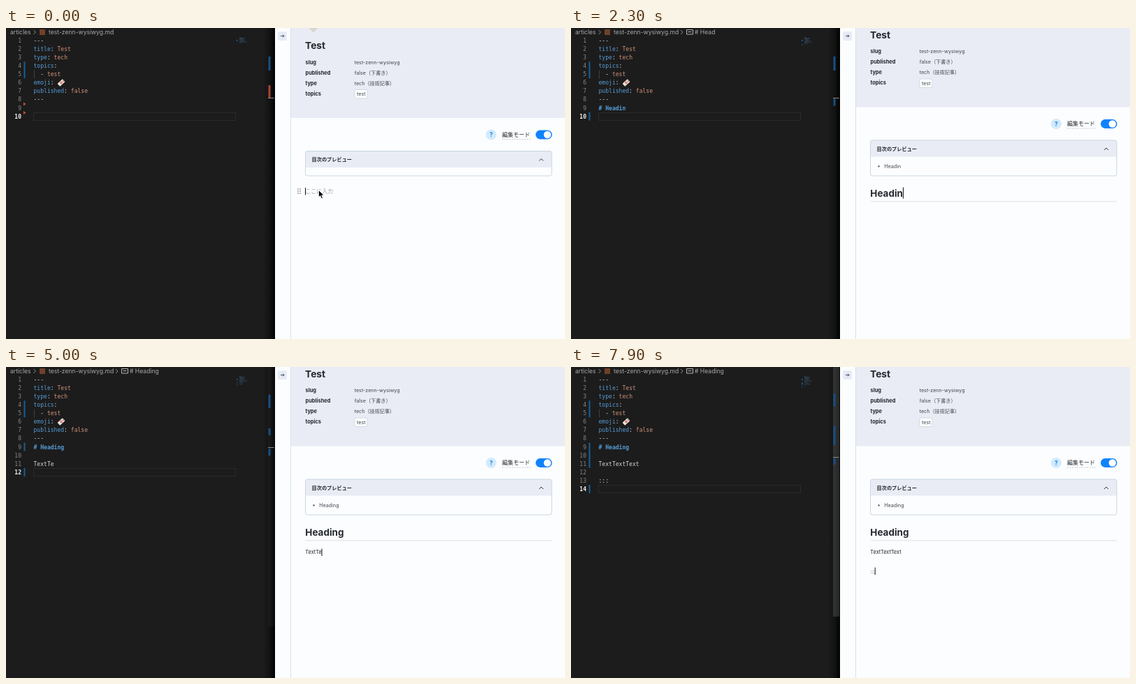
Animation of 800 by 446 pixels, one loop 8000 ms. Source, as an HTML page:

```html
<!DOCTYPE html>
<html lang="ja">
<head>
<meta charset="utf-8">
<title>Markdown editor</title>
<style>
html, body { margin: 0; width: 100%; height: 100%; overflow: hidden; background: #fcfdff; }
svg { display: block; width: 800px; height: 446px; }
text { font-family: Inter, "Noto Sans CJK JP", "Noto Sans CJK", sans-serif; fill: #24292f; white-space: pre; }
.code text { font: 8.05px "DejaVu Sans Mono", monospace; fill: #d4d4d4; }
.code .num { fill: #858585; text-anchor: end; }
.code .num.on { fill: #f0f0f0; font-weight: bold; }
.key { fill: #569cd6; }
.str { fill: #ce9178; }
.code #markLine.h { fill: #569cd6; font-weight: bold; }
.code #markLine.esc { fill: #d7ba7d; }
.crumb text { font-size: 8.6px; fill: #a9a9a9; }
.line { fill: none; stroke-width: 1; }
.label { font-size: 7.45px; font-weight: 700; }
.value { font-size: 7.15px; fill: #40464d; }
.body { font-size: 7.4px; }
.title { font-size: 13.8px; font-weight: 700; }
.heading { font-size: 13.5px; font-weight: 700; }
.body.empty { font-size: 8px; fill: #9da1a6; }
.heading.empty { font-size: 13.6px; fill: #63676d; }
</style>
</head>
<body>
<svg viewBox="0 0 800 446">
  <defs>
    <linearGradient id="shade">
      <stop offset="0" stop-color="#000" stop-opacity="0"/>
      <stop offset=".55" stop-color="#000" stop-opacity=".35"/>
      <stop offset="1" stop-color="#000" stop-opacity=".95"/>
    </linearGradient>
  </defs>

  <rect width="385" height="446" fill="#1c1c1c"/>
  <g class="crumb">
    <text x="6" y="9">articles</text>
    <path class="line" stroke="#8a8a8a" d="M39.5 3l3 3-3 3"/>
    <rect x="48" y="2" width="8" height="8" fill="#70412a"/>
    <text x="61" y="9">test-zenn-wysiwyg.md</text>
    <g id="symbol">
      <path class="line" stroke="#8a8a8a" d="M157 3l3 3-3 3"/>
      <path class="line" stroke="#b5b5b5" d="M165.5 2.5h9v6.500h-9zM167.500 5.500h5"/>
      <text id="crumb" x="177" y="9"></text>
    </g>
  </g>
  <g class="code">
    <rect id="activeLine" class="line" x="39.5" width="289" height="11" stroke="#2a2a2a"/>
    <path class="line" stroke="#404040" d="M40.5 60.500v12"/>
    <g id="numbers"></g>
    <g id="front"></g>
    <text id="markLine" x="39.500"></text>
    <text id="textLine" x="39.500"></text>
    <text id="colonLine" x="39.500"></text>
    <g transform="translate(79 78.500) rotate(-42)">
      <rect x="-5" y="-2.700" width="10" height="5.400" rx="1" fill="#eadfd9"/>
      <rect x="-1.500" y="-1.700" width="3" height="3.400" fill="#d58078"/>
      <circle cx="3.600" r=".9" fill="#b04a45"/>
    </g>
  </g>
  <path id="deleted" fill="#c74e39" d="M25 106.500l3.500 2.500-3.500 2.500zM25 119l3.500 2.500-3.500 2.500z"/>
  <path id="gutter" fill="#155f97"/>
  <path id="minimap" stroke="#40617a" stroke-width=".8" opacity=".65"/>
  <path id="minimarks" fill="#1b5d8c"/>
  <rect x="368" width="17" height="446" fill="url(#shade)"/>
  <rect id="slider" x="375" width="9" fill="#666"/>
  <path id="ruler" fill="#174f82"/>
  <rect id="rulerRed" x="375.500" y="82" width="3" height="18" fill="#a44434"/>
  <rect id="rulerCaret" x="375" width="8.500" height="1" fill="#8b8b8b"/>

  <rect x="385" width="415" height="446" fill="#fcfdff"/>
  <rect x="389" y="5" width="13" height="13" rx="2.500" fill="#e6ebf5"/>
  <path class="line" stroke="#4a5568" stroke-width=".9" d="M393 11.500h5m-2-2l2 2-2 2"/>

  <g id="page">
    <rect x="408" y="-20" width="392" height="149" fill="#e9ecf4"/>
    <path d="M433.500 0h13l-6.500 6.500z" fill="#d8d4cf"/>
    <text class="title" x="428" y="30">Test</text>
    <text class="label" x="428.500" y="51.500">slug</text>
    <text class="label" x="428.500" y="66.500">published</text>
    <text class="label" x="428.500" y="81.500">type</text>
    <text class="label" x="428.500" y="96.500">topics</text>
    <text class="value" x="498.700" y="51.500">test-zenn-wysiwyg</text>
    <text class="value" x="498.700" y="66.500">false（下書き）</text>
    <text class="value" x="498.700" y="81.500">tech（技術記事）</text>
    <rect x="499" y="88.500" width="18" height="12.500" rx="2" fill="#fff" stroke="#d0d8e4"/>
    <text class="value" x="502" y="97.200">test</text>
    <circle cx="694.300" cy="153" r="7.500" fill="#d3eafb"/>
    <text x="694.300" y="156" font-size="8.500" font-weight="700" text-anchor="middle" style="fill:#1486e8">?</text>
    <text x="710" y="155.700" font-size="8">編集モード</text>
    <path class="line" stroke="#c3cad3" stroke-dasharray="2 1.500" d="M710 159.500h41"/>
    <rect x="758" y="146.500" width="23.500" height="13" rx="6.500" fill="#1083fb"/>
    <circle cx="774.800" cy="153" r="5.200" fill="#fff"/>
    <path d="M428.500 200v-20.500a3 3 0 0 1 3-3h346.500a3 3 0 0 1 3 3v20.500z" fill="#e9ecf4"/>
    <text class="label" x="437.500" y="191.300" style="font-size:7.2px">目次のプレビュー</text>
    <path class="line" stroke="#30363d" stroke-width="1.200" d="M763 190.500l3-3 3 3"/>
  </g>
  <path class="line" stroke="#d3e2ec" d="M407.500 0v446"/>
  <rect id="toc" class="line" x="428.500" width="352.500" rx="3" stroke="#c8d7e2"/>
  <circle id="bullet" cx="440.500" r="1.100" fill="#30363d"/>
  <text id="tocText" class="value" x="448.300" y="200.700"></text>

  <g id="handle" fill="#929292"></g>
  <path id="rule" class="line" stroke="#dbe1e7" d="M428.500 248.800h352.500"/>
  <text id="first" x="428.300"></text>
  <text id="second" x="428.300" y="268.300"></text>
  <text id="third" x="428.300" y="295.500"></text>
  <rect id="caret" width="1" fill="#111"/>
  <path id="pointer" d="M447.500 232.500v10.300l2.300-2.200 1.700 3.900 1.900-.8-1.700-3.800h3.200z" fill="#000" stroke="#fff" stroke-width=".8"/>
</svg>
<script>
const LOOP = 8000, PITCH = 12.07;
const HINT = 'ここに入力';
const HEADING = 'Heading', TEXT = 'TextTextText';

// Times at which each character appears in the preview
const headingKeys = [1300, 1500, 1700, 1900, 2050, 2200, 2400];
const textKeys = [3600, 3800, 4000, 4200, 4600, 4850, 5100, 5350, 5600, 5800, 6100, 6300];
const colonKeys = [7400, 7600, 7800];

const $ = id => document.getElementById(id);
const lineY = n => 18 + PITCH * (n - 1);
const typed = (word, keys, t) => word.slice(0, keys.filter(k => k <= t).length);
const clamp = v => Math.max(0, Math.min(1, v));
const show = (id, on) => { $(id).style.display = on ? '' : 'none'; };
const set = (id, attrs) => { for (const k in attrs) $(id).setAttribute(k, attrs[k]); };
const bars = (x, w, spans) => spans.map(([a, b]) => `M${x} ${a}h${w}V${b}h${-w}z`).join('');

function write(id, value, cls) {
  const el = $(id);
  if (el.textContent !== value) el.textContent = value;
  if (cls !== undefined) el.setAttribute('class', cls);
}

const front = [
  [['', '---']],
  [['key', 'title'], ['', ': '], ['str', 'Test']],
  [['key', 'type'], ['', ': '], ['str', 'tech']],
  [['key', 'topics'], ['', ':']],
  [['', '  - '], ['str', 'test']],
  [['key', 'emoji'], ['', ':']],
  [['key', 'published'], ['', ': '], ['str', 'false']],
  [['', '---']]
];
$('front').innerHTML = front.map((parts, i) =>
  `<text x="39.5" y="${lineY(i + 1) + 3}">` +
  parts.map(([c, s]) => `<tspan class="${c}">${s}</tspan>`).join('') + '</text>').join('');
$('numbers').innerHTML = Array.from({ length: 14 }, (_, i) =>
  `<text class="num" x="22" y="${lineY(i + 1) + 3}">${i + 1}</text>`).join('');
$('handle').innerHTML = [0, 1, 2, 3, 4, 5].map(i =>
  `<circle cx="${418 + i % 2 * 3}" cy="${231 + (i >> 1) * 3}" r=".9"/>`).join('');
['markLine', 'textLine', 'colonLine'].forEach((id, i) => set(id, { y: lineY(9 + 2 * i) + 3 }));
const numbers = [...$('numbers').children];

function drawEditor(t) {
  const count = t < 3700 ? 10 : t < 7500 ? 12 : 14;
  const lag = t - 100;
  const mark = t < 300 ? '' : t < 1000 ? '\\#' : '# ' + typed(HEADING, headingKeys, lag);
  const text = typed(TEXT, textKeys, lag);
  const colons = typed(':::', colonKeys, lag);
  write('markLine', mark, t < 1000 ? 'esc' : 'h');
  write('textLine', text);
  write('colonLine', colons);

  const outline = typed(HEADING, headingKeys, t - 350);
  show('symbol', outline);
  write('crumb', '# ' + outline);

  numbers.forEach((el, i) => {
    el.style.display = i < count ? '' : 'none';
    el.setAttribute('class', i === count - 1 ? 'num on' : 'num');
  });
  set('activeLine', { y: Math.round(lineY(count) - 5.6) + .5 });

  const untouched = t < 300;
  show('deleted', untouched);
  show('rulerRed', untouched);
  const changed = [[4, 5]];
  if (count === 14) changed.push([9, 11], [14, 14]);
  else if (count === 12) changed.push([9, 9], [12, 12]);
  else if (!untouched) changed.push(t >= 1400 && t < 2800 ? [10, 10] : [9, 9]);
  set('gutter', { d: bars(25.5, 2, changed.map(([a, b]) => [lineY(a) - 6, lineY(b) + 6])) });
  set('minimarks', { d: bars(330, 1.6, changed.map(([a, b]) => [12.3 + a * 1.1, 13.4 + b * 1.1])) });

  const step = count === 10 ? 10.1 : count === 12 ? 9.7 : 9.25;
  set('ruler', { d: bars(375.5, 3, changed.map(([a, b]) => [10.5 + (a - 1) * step, 10.5 + b * step])) });
  set('rulerCaret', { y: count === 10 ? 100 : count === 12 ? 115 : 129 });

  const widths = [3, 11, 10, 7, 10, 8, 16, 3, mark.length, 0, text.length, 0, colons.length];
  set('minimap', { d: widths.map((w, i) => `M${i === 4 ? 335.5 : 334} ${13.5 + i * 1.1}h${w * .7}`).join('') });

  const fade = t < 7000 ? clamp((t - 3700) / 200) * clamp((5200 - t) / 900) : clamp((t - 7550) / 200);
  set('slider', { height: t < 7000 ? 372 : 358, opacity: .36 * fade });
}

function drawPreview(t) {
  const isHeading = t >= 800;
  const heading = typed(HEADING, headingKeys, t);
  const text = typed(TEXT, textKeys, t);
  const colons = typed(':::', colonKeys, t);
  const shift = heading ? -15.5 : isHeading ? -12 : 0;

  set('page', { transform: `translate(0 ${shift})` });
  set('toc', { y: 176.5 + shift, height: 35.5 - shift });
  show('bullet', isHeading);
  set('bullet', { cy: heading ? 198.4 : 201.6 });
  write('tocText', heading);
  show('rule', isHeading);
  set('rule', { transform: `translate(0 ${isHeading && !heading ? .8 : 0})` });
  show('handle', t < 100);
  show('pointer', t < 100);

  const first = isHeading ? heading : t < 100 ? '' : '#';
  const kind = isHeading ? 'heading' : 'body';
  write('first', first || HINT, first ? kind : kind + ' empty');
  set('first', { y: isHeading ? 241.8 : 237 });
  const hasSecond = t >= 3100, hasThird = t >= 6900;
  write('second', hasSecond ? text || HINT : '', text ? 'body' : 'body empty');
  write('third', hasThird ? colons || HINT : '', colons ? 'body' : 'body empty');

  const [id, value, y, height] =
    hasThird ? ['third', colons, 287.5, 10.5] :
    hasSecond ? ['second', text, 260.5, 10.5] :
    isHeading ? ['first', heading, 228.5, 16] : ['first', first, 229, 10.5];
  const x = value ? 428.3 + $(id).getComputedTextLength() : 428;
  set('caret', { x, y, height });
}

function frame() {
  const t = performance.now() % LOOP;
  drawEditor(t);
  drawPreview(t);
  requestAnimationFrame(frame);
}
frame();
</script>
</body>
</html>
```
